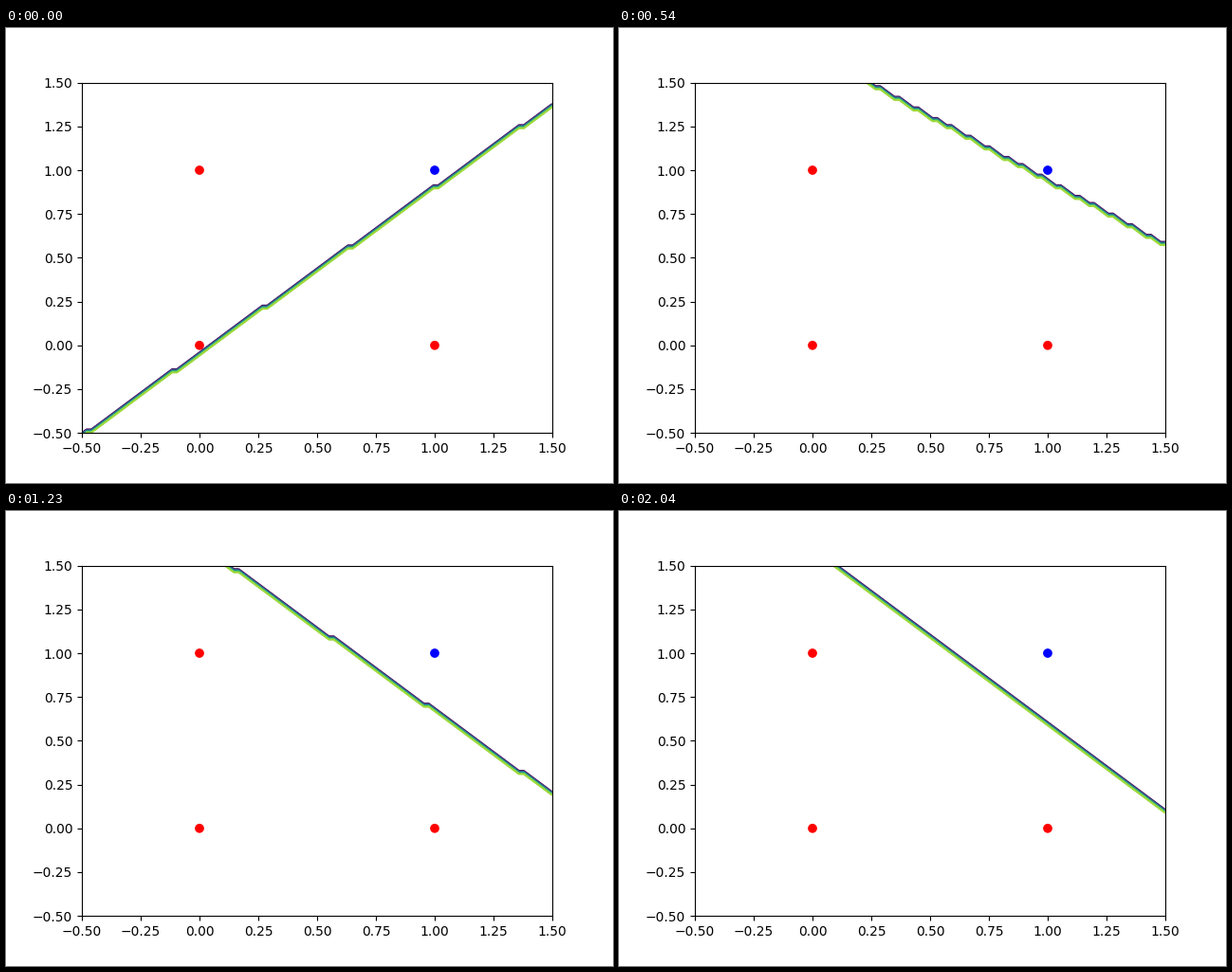
Write a matplotlib script that moves like this. It is 640 px wide and 480 px high and loops after 2.1 s.

```python
import numpy as np
import matplotlib.pyplot as plt
from matplotlib.animation import FuncAnimation

FRAMES = 70
INTERVAL = 30
RATE = 1.0

# Logical AND, with a constant input for the bias
points = np.array([[0, 0], [0, 1], [1, 0], [1, 1]])
target = np.array([0, 0, 0, 1])
inputs = np.column_stack([points, np.ones(4)])


def train(weights, steps):
    """Weights of a logistic neuron after each gradient step."""
    history = [weights]
    for _ in range(steps - 1):
        output = 1 / (1 + np.exp(-inputs @ weights))
        weights = weights - RATE * inputs.T @ (output - target) / len(target)
        history.append(weights)
    return history


history = train(np.array([-0.3937, 0.4165, 0.0191]), FRAMES)

axis = np.linspace(-0.5, 1.5, 100)
X, Y = np.meshgrid(axis, axis)

fig, ax = plt.subplots(figsize=(6.4, 4.8), dpi=100)
ax.scatter(*points.T, c=np.where(target, "blue", "red"))
ax.set_xlim(-0.5, 1.5)
ax.set_ylim(-0.5, 1.5)

boundary = []


def clear():
    while boundary:
        boundary.pop().remove()
    return []


def update(i):
    clear()
    w1, w2, b = history[i]
    region = (w1 * X + w2 * Y + b < 0).astype(float)
    # No boundary while the whole view is one class
    if region.min() < region.max():
        boundary.append(ax.contour(X, Y, region))
    return boundary


anim = FuncAnimation(fig, update, frames=FRAMES, init_func=clear,
                     interval=INTERVAL, repeat=True, repeat_delay=0, blit=False)
plt.show()
```
